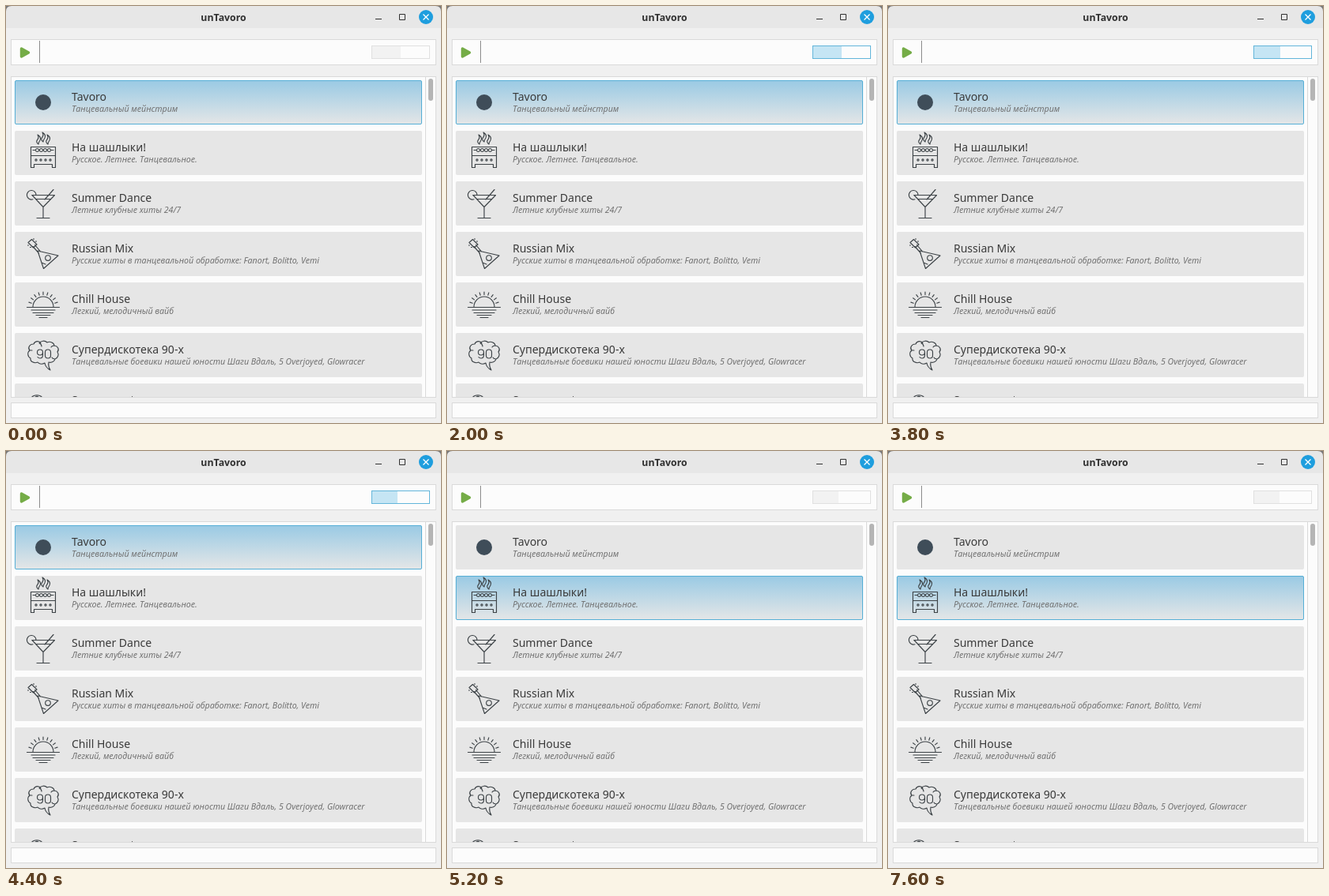
These frames come from a looping animation (550 by 528 pixels, 8000 ms). An HTML page:

```html
<!DOCTYPE html>
<html lang="ru">
<head>
<meta charset="utf-8">
<title>unTavoro</title>
<style>
  html, body { margin: 0; width: 100%; height: 100%; overflow: hidden; background: #f0f0f0; }
  svg { display: block; width: 550px; height: 528px; font-family: "Noto Sans", sans-serif; }
  .panel { fill: #fcfcfc; stroke: #dadada; }
  .icon { fill: none; stroke: #3d4347; stroke-width: 1.15; stroke-linejoin: round; stroke-linecap: round; }
  .name { font-size: 14px; fill: #3a3a3a; }
  .note { font-size: 10.6px; font-style: italic; fill: #707070; }
</style>
</head>
<body>
<svg viewBox="0 0 550 528">
  <defs>
    <linearGradient id="glow" x2="0" y2="1">
      <stop stop-color="#9acae4"/><stop offset="1" stop-color="#e4e6e7"/>
    </linearGradient>
    <clipPath id="view"><path d="M7 90H530V495H7Z"/></clipPath>
  </defs>

  <path fill="#777" d="M0 0H550V8H0Z"/>
  <path fill="#f0f0f0" d="M0 8H550V528H0Z"/>
  <path fill="#e7e7e7" d="M0 28V7Q0 0 7 0H543Q550 0 550 7V28Z"/>
  <text x="275" y="19" text-anchor="middle" font-size="12.3" font-weight="700" fill="#303030">unTavoro</text>
  <g fill="none" stroke="#303030">
    <path d="M467 16.5H475M497.5 10.5H504.5V17.5H497.5Z"/>
    <circle cx="531" cy="14" r="9" fill="#1f9ede" stroke="none"/>
    <path d="M527.5 10.5L534.5 17.5M534.5 10.5L527.5 17.5" stroke="#fff" stroke-width="1.3"/>
  </g>

  <rect class="panel" x="6.5" y="42.5" width="537" height="32"/>
  <path d="M19.5 54V64L28.5 59Z" fill="#75ac47" stroke="#75ac47" stroke-width="3.4" stroke-linejoin="round"/>
  <path d="M42.5 44V72" stroke="#8c8c8c"/>
  <rect id="track" x="462.5" y="50.5" width="73" height="16" fill="#fcfcfc" stroke="#e0e0e0"/>
  <rect id="level" x="463" y="51" width="36" height="15" fill="#f2f2f2"/>

  <rect class="panel" x="6.5" y="89.5" width="537" height="406" fill="#fff"/>
  <g id="list" clip-path="url(#view)"></g>
  <path d="M530.5 90V495" stroke="#dadada"/>
  <rect x="534" y="92" width="6" height="28" rx="3" fill="#b5b5b5"/>
  <rect class="panel" x="6.5" y="502.5" width="537" height="19"/>
</svg>

<script>
const LOOP = 8000;
const list = document.getElementById('list');

// Icons are drawn relative to the top of their row.
const repeat = (count, draw) => Array.from({ length: count }, (_, i) => draw(i)).join('');

const flame = (x, y) => `M${x} ${y}q-4 -3 -1 -6q2 -3 0 -6q5 3 3 7q-2 3 -2 5`;
const grill = `<path d="M31.5 20.5H62.5V46.5H58.5V42.5H35.5V46.5H31.5ZM31.5 31.5H62.5
  M34 24.5h3${repeat(4, () => 'q2.500 4 5 0')}h3M37 24.5${repeat(4, () => 'q2.500 -4 5 0')}
  ${flame(41, 17)}${flame(47, 14)}${flame(53, 17)}"/>`
  + repeat(4, i => `<circle cx="${38 + 6 * i}" cy="37" r="1.1"/>`);

const cocktail = `<path d="M33 17.5H61.5L47 32.5ZM47 32.5V46M39 46.5H55M38 22.5H56.5M60 10.5L49 23"/>
  <path d="M38 17.500A5.800 5.800 0 1 0 34 22.800M33 17.500L37 17.500"/>`;

const guitar = `<path d="M40 24L66 30L47.500 46.500ZM41.500 27L34 18.500M43.500 24.800L36.500 16.500
  M28 13.500L32.500 9.500L39 16L34.500 20ZM27.500 17h1M30.500 19.500h1M35 9.500v-1M38 12.500v-1M45 39l5 2"/>
  <circle cx="53" cy="33" r="3.300"/>`;

const ray = i => {
  const a = Math.PI * (i + 1) / 10, c = Math.cos(a), s = Math.sin(a);
  return `M${47 - 15.5 * c} ${31 - 15.5 * s}L${47 - 19 * c} ${31 - 19 * s}`;
};
const sun = `<path d="M26.500 31.500H67.500M34 31A13 13 0 0 1 60 31M32 35H62M34 38.500H60M38 41.500H56M42 44.500H52${repeat(9, ray)}"/>`;

const brain = `<path d="M42 13a6 5 0 0 1 10 -1a6 5 0 0 1 9 4a6 5 0 0 1 4 8a6 6 0 0 1 -3 9a6 5 0 0 1 -8 4
  q-1 5 2 10q-6 -3 -7 -9a6 5 0 0 1 -9 -1a6 5 0 0 1 -9 -5a6 6 0 0 1 -1 -10a6 5 0 0 1 5 -8a5 5 0 0 1 9 -1
  M42 13q3 1 3 4M61 16q-3 0 -4 2M30 22h3M62 33q-3 0 -4 -2"/>
  <circle cx="43" cy="24.500" r="3.500"/><path d="M46.500 24.500V28Q46.500 32 43 32Q41 32 40 30.500"/>
  <rect x="49.500" y="21" width="7" height="11" rx="3.500"/>`;

const face = `<path d="M31 20A8.500 8 0 0 1 47 20M36 18q3 -3 6 0"/><circle cx="39" cy="17" r="1"/>`;

const stations = [
  ['Tavoro', 'Танцевальный мейнстрим', '<circle cx="47" cy="28" r="10" fill="#3f4d59" stroke="none"/>'],
  ['На шашлыки!', 'Русское. Летнее. Танцевальное.', grill],
  ['Summer Dance', 'Летние клубные хиты 24/7', cocktail],
  ['Russian Mix', 'Русские хиты в танцевальной обработке: Fanort, Bolitto, Vemi', guitar],
  ['Chill House', 'Легкий, мелодичный вайб', sun],
  ['Супердискотека 90-х', 'Танцевальные боевики нашей юности Шаги Вдаль, 5 Overjoyed, Glowracer', brain],
  ['Summer set', '', face]
];

list.innerHTML = stations.map(([name, note, icon], i) => `
  <g transform="translate(0 ${94 + 64 * i})">
    <rect x="11" width="515" height="56" rx="2" fill="#e6e6e6"/>
    <rect class="glow" x="11.5" y=".5" width="514" height="55" rx="1.5" fill="url(#glow)" stroke="#56afd6" opacity="0"/>
    <g class="icon">${icon}</g>
    <text class="name" x="83" y="26">${name}</text>
    <text class="note" x="83" y="40">${note}</text>
  </g>`).join('');

// Each step is [time, value] and holds until the next one.
function play(target, property, steps) {
  const frames = steps.map(([time, value]) => ({ offset: time / LOOP, [property]: value, easing: 'step-end' }));
  frames.push({ ...frames.at(-1), offset: 1 });
  target.animate(frames, { duration: LOOP, iterations: Infinity });
}

const track = document.getElementById('track');
const level = document.getElementById('level');
const [first, second] = list.querySelectorAll('.glow');

play(track, 'stroke', [[0, '#e0e0e0'], [2000, '#62b5da'], [4800, '#e0e0e0']]);
play(level, 'fill', [[0, '#f2f2f2'], [2000, '#c5e5f4'], [4800, '#f2f2f2']]);
play(level, 'width', [
  [0, 36], [2300, 37], [2600, 38], [2800, 39], [2900, 38], [3000, 37], [3100, 36],
  [3600, 35], [3700, 34], [3800, 33], [4000, 32]
].map(([time, px]) => [time, px + 'px']));
play(first, 'opacity', [[0, 1], [5200, 0]]);
play(second, 'opacity', [[0, 0], [5200, 1]]);
</script>
</body>
</html>
```
